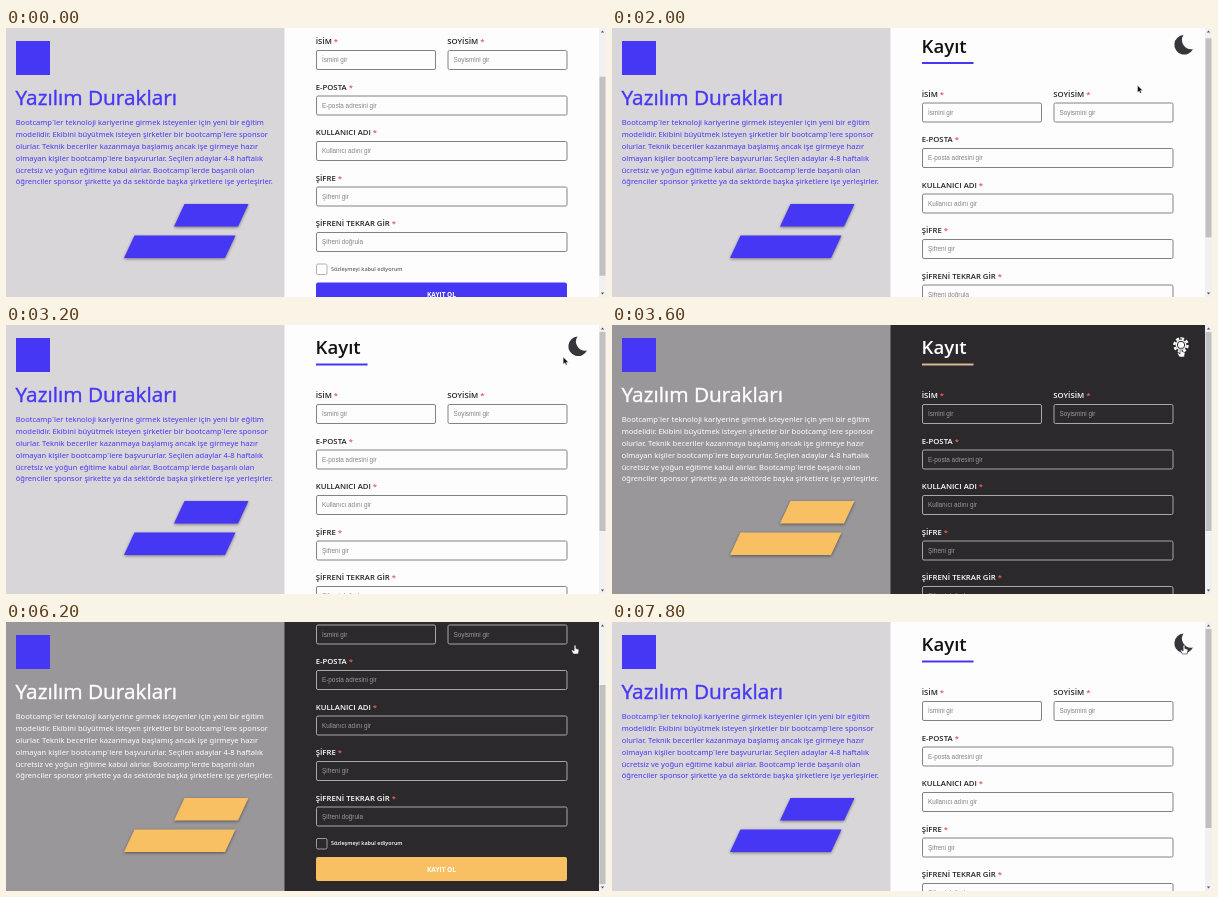
Recreate the animation shown at these times as an HTML page. Size 600 by 269 pixels, loop 8000 ms.

```html
<!DOCTYPE html>
<html lang="tr">
<head>
<meta charset="utf-8">
<title>Kayıt</title>
<style>
  html, body { margin: 0; height: 100%; overflow: hidden; }
  svg {
    display: block; width: 100%; height: 100%;
    font-family: "Open Sans", "Noto Sans", sans-serif;
    --side: #d8d6d9; --page: #fefdfe; --accent: #4637f5; --copy: #4637f5;
    --title: #111; --ink: #222; --border: #828282; --hint: #858585;
    --line: #4637f5; --terms: #666; --check: #aaa; --star: #e2504f;
  }
  svg.dark {
    --side: #999799; --page: #2b292b; --accent: #f8bf63; --copy: #fff;
    --title: #fff; --ink: #fff; --border: #a9a8a9; --hint: #9a999a;
    --line: #dcb595; --terms: #fff; --check: #a9a8a9; --star: #f4605c;
  }
  .side { fill: var(--side); }
  .page { fill: var(--page); }
  .accent { fill: var(--accent); }
  .shape { fill: var(--accent); filter: drop-shadow(0 1px 1.5px rgba(0, 0, 0, .45)); }
  .heading { fill: var(--copy); stroke: var(--copy); stroke-width: .4px; font-size: 20.8px; }
  .copy { fill: var(--copy); font: 7.55px "Noto Sans", "Open Sans", sans-serif; }
  .title { fill: var(--title); font-size: 18.6px; font-weight: 600; }
  .label { fill: var(--ink); font-size: 7.75px; font-weight: 600; }
  .star { fill: var(--star); }
  .box { fill: none; stroke: var(--border); }
  .check { fill: none; stroke: var(--check); stroke-width: .9px; }
  .hint { fill: var(--hint); font: 6.35px "Liberation Sans", Arial, sans-serif; }
  .terms { fill: var(--terms); font-size: 5.45px; font-weight: 600; }
  .send { fill: #fff; font-size: 6.5px; font-weight: 700; text-anchor: middle; }
  .line { fill: var(--line); }
  .moon { fill: #38363c; }
  .sun, .dark .moon { display: none; }
  .dark .sun { display: inline; }
</style>
</head>
<body>
<svg id="stage" viewBox="0 0 600 269" preserveAspectRatio="none">
  <rect class="page" x="278" width="316" height="269"/>
  <rect class="side" width="278.5" height="269"/>
  <rect x="10" y="13" width="34" height="34" fill="#4637f5"/>
  <text class="heading" x="9.5" y="77">Yazılım Durakları</text>
  <g id="copy"></g>
  <path class="shape" d="M178.500 176H242.500L232 198.500H168Z"/>
  <path class="shape" d="M128.500 207.500H229.500L219 230H118Z"/>

  <g id="form">
    <text class="title" x="309.500" y="29">Kayıt</text>
    <rect class="line" x="310" y="38.500" width="51.500" height="2"/>
    <path class="moon" d="M571.500 11.500A9.800 9.800 0 1 0 581 25.500A9.200 9.200 0 0 1 571.500 11.500Z"/>
    <g class="sun" fill="none">
      <circle cx="569" cy="20" r="5.400" fill="#fff"/>
      <circle cx="569" cy="20" r="6.600" stroke="#fff" stroke-width="2.400" pathLength="80" stroke-dasharray="6 4"/>
      <circle cx="569" cy="20" r="3.700" stroke="#2b292b"/>
    </g>
    <g id="fields"></g>
    <rect class="check" x="310.500" y="293" width="10.500" height="10.500" rx="1.500"/>
    <text class="terms" x="325" y="299.800">Sözleşmeyi kabul ediyorum</text>
    <rect class="accent" x="310" y="311.500" width="251" height="24" rx="2"/>
    <text class="send" x="435.500" y="326">KAYIT OL</text>
  </g>

  <rect x="593" width="7" height="269" fill="#f1f1f1"/>
  <rect id="thumb" x="593.500" y="7" width="6" height="199" fill="#c1c1c1"/>
  <path d="M594.800 4.500L596.500 2.500L598.200 4.500ZM594.800 264.500L596.500 266.500L598.200 264.500Z" fill="#555"/>

  <path id="arrow" d="M0 0V7.200L1.700 5.700L2.800 8L4 7.400L3 5.200H5.200Z" fill="#111" stroke="#fff" stroke-width=".4"/>
  <path id="hand" d="M-.9 0Q0-1 .9 0V3L3.500 3.800Q4 4 3.900 5L3.200 8.500H-1.600L-3.500 5.200Q-3.400 4-2.200 4.600L-.9 5.500Z" fill="#fff" stroke="#333" stroke-width=".6"/>
</svg>
<script>
const $ = id => document.getElementById(id);

const lines = [
  'Bootcamp`ler teknoloji kariyerine girmek isteyenler için yeni bir eğitim',
  'modelidir. Ekibini büyütmek isteyen şirketler bir bootcamp`lere sponsor',
  'olurlar. Teknik beceriler kazanmaya başlamış ancak işe girmeye hazır',
  'olmayan kişiler bootcamp`lere başvururlar. Seçilen adaylar 4-8 haftalık',
  'ücretsiz ve yoğun eğitime kabul alırlar. Bootcamp`lerde başarılı olan',
  'öğrenciler sponsor şirkette ya da sektörde başka şirketlere işe yerleşirler.'
];
$('copy').innerHTML = lines.map((s, i) =>
  `<text class="copy" x="9.7" y="${96.9 + i * 11.9}">${s}</text>`).join('');

const field = (x, row, width, label, hint) => {
  const y = 73.3 + row * 45.5;
  return `<text class="label" x="${x - .3}" y="${y}">${label} <tspan class="star">*</tspan></text>
    <rect class="box" x="${x + .5}" y="${y + 6.2}" width="${width}" height="19" rx="1.5"/>
    <text class="hint" x="${x + 6}" y="${y + 17.8}">${hint}</text>`;
};
$('fields').innerHTML =
  field(310, 0, 119, 'İSİM', 'İsmini gir') +
  field(441.5, 0, 119, 'SOYİSİM', 'Soyismini gir') +
  field(310, 1, 250.5, 'E-POSTA', 'E-posta adresini gir') +
  field(310, 2, 250.5, 'KULLANICI ADI', 'Kullanıcı adını gir') +
  field(310, 3, 250.5, 'ŞİFRE', 'Şifreni gir') +
  field(310, 4, 250.5, 'ŞİFRENİ TEKRAR GİR', 'Şifreni doğrula');

const LOOP = 8000, MAX_SCROLL = 76.5, THUMB_TRAVEL = 56;

// Each track is a list of [start time, value...]; the screen updates in hard steps.
const scrolls = [
  [0, 57], [800, 16], [1000, 0],
  [2000, 4.5], [2200, 9], [2400, 70], [2600, MAX_SCROLL], [2800, 0],
  [5600, 11], [5800, MAX_SCROLL], [6400, 9], [6600, 0]
];
const pointers = [
  [0, ''], [2000, 'arrow', 525.5, 57.3], [2200, 'arrow', 530, 53],
  [3200, 'arrow', 557.2, 32], [3600, 'hand', 569, 23.5], [7800, 'hand', 572, 23.5]
];
const at = (track, t) => track.findLast(step => step[0] <= t);

function draw(now) {
  const t = now % LOOP;
  const scroll = at(scrolls, t)[1];
  const [, kind, x, y] = at(pointers, t);
  $('stage').classList.toggle('dark', t >= 3600 && t < 7800);
  $('form').setAttribute('transform', `translate(0 ${-scroll})`);
  $('thumb').setAttribute('y', 7 + THUMB_TRAVEL * scroll / MAX_SCROLL);
  for (const id of ['arrow', 'hand']) {
    $(id).style.display = id === kind ? '' : 'none';
    if (id === kind) $(id).setAttribute('transform', `translate(${x} ${y})`);
  }
}

const start = performance.now();
function tick() {
  draw(performance.now() - start);
  requestAnimationFrame(tick);
}
tick();
</script>
</body>
</html>
```
